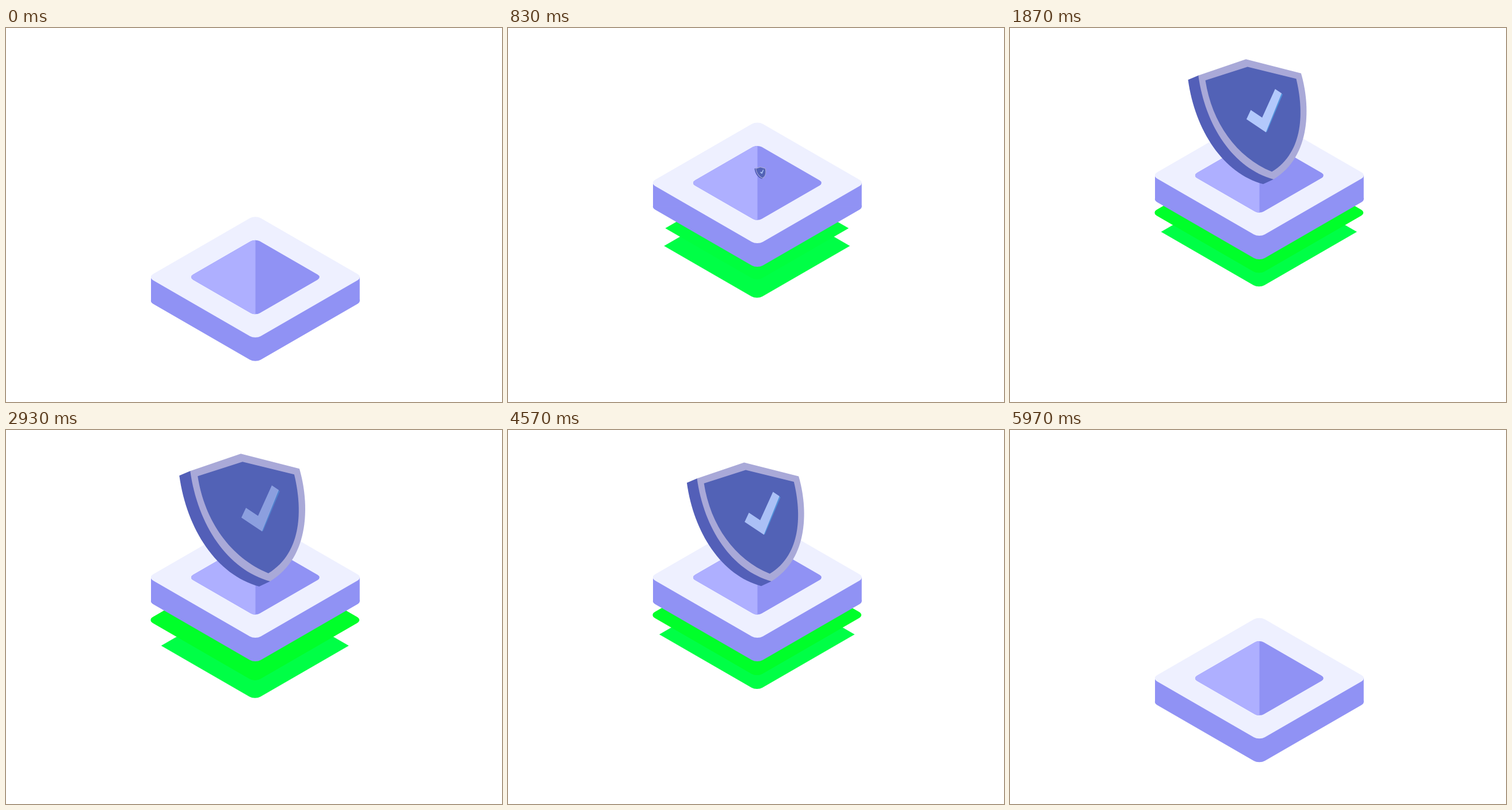
An HTML page with a canvas for the animation above (6010 ms loop, 862 by 650 pixels).

```html
<!DOCTYPE html>
<html lang="en">
<head>
<meta charset="utf-8">
<title>Shield platform</title>
<style>
  html, body { margin: 0; width: 100%; height: 100%; overflow: hidden; background: #fff; }
  canvas { display: block; }
</style>
</head>
<body>
<canvas id="stage" width="862" height="650"></canvas>
<script>
const ctx = document.getElementById('stage').getContext('2d');
const LOOP = 6010, CX = 433.3;

// Sine ease-in-out from 0 to 1 while s runs from a to b
const ease = (s, a, b) => {
  const u = Math.min(1, Math.max(0, (s - a) / (b - a)));
  return (1 - Math.cos(Math.PI * u)) / 2;
};
// Rises from a to peak, falls from peak to b
const bump = (s, a, peak, b) => s < peak ? ease(s, a, peak) : 1 - ease(s, peak, b);

// Isometric rounded square centred on (x, y)
function tile(x, y, side, r) {
  const path = new Path2D(), square = new Path2D();
  square.roundRect(-side / 2, -side / 2, side, side, r);
  path.addPath(square, new DOMMatrix([.866, .5, -.866, .5, x, y]));
  return path;
}

function fill(path, color) {
  ctx.fillStyle = color;
  ctx.fill(path);
}

function platform(y) {
  const top = tile(CX, y, 216, 11), well = tile(CX, y, 134, 9);
  fill(tile(CX, y + 41, 216, 11), '#9092f4');
  ctx.fillRect(252, y, 362.7, 41);
  fill(top, '#eef0ff');
  fill(well, '#9092f4');
  ctx.save();
  ctx.clip(well);
  ctx.fillStyle = '#aeafff';
  ctx.fillRect(300, y - 80, 133.5, 160);
  ctx.restore();
}

// Green sheet whose upper edge is cut away by the given amount
function sheet(y, cut, color) {
  ctx.save();
  ctx.clip(tile(432.7, y + cut, 216, 11));
  fill(tile(432.7, y, 216, 11), color);
  ctx.restore();
}

const SIDE = new Path2D('M301 79L320 71L408 60L459 263L440 272C366 252 314 173 301 79Z');
const RIM = new Path2D('M408 41L510 67C527 125 530 220 459 263C385 243 333 165 320 71Z');
const FACE = new Path2D('M411 55L501 77C515 135 516 212 456 249C390 222 345 158 333 80Z');
const TICK_EDGE = new Path2D('M462 96L476 106L447 176L445 176L409 152Z');
const TICK = new Path2D('M417 135L438 149L462 96L474 104L445 176L409 152Z');
const TICK_SHADE = new Path2D('M473 104L476 106L447 175L444.5 176Z');

function shield(scale, glow) {
  if (scale <= 0) return;
  ctx.save();
  ctx.translate(441.2, 261.3);
  ctx.scale(scale, scale);
  ctx.translate(-441.2, -261.3);
  fill(SIDE, '#535fb8');
  fill(RIM, '#a9a9d8');
  fill(FACE, '#5262b6');
  ctx.globalAlpha = glow;
  fill(TICK_SHADE, '#5294dc');
  fill(TICK, '#b4cafc');
  ctx.restore();
}

function draw(s) {
  ctx.fillStyle = '#fff';
  ctx.fillRect(0, 0, 862, 650);

  const y = 433 - 176.7 * (ease(s, .0085, 1.0085) - ease(s, 5.327, 6.007));
  if (y < 345) {
    const lift = s > 1 && s < 5.4 ? (1 - Math.cos(2 * Math.PI * (s - 1) / 2.2)) / 2 : 0;
    const solid = ease(s, 1, 1.5) - ease(s, 4.9, 5.4);
    sheet(364 - 21.8 * lift, 29.4 - 11 * lift, 'rgb(0,255,70)');
    sheet(332 - 12.3 * lift, 32 * (1 - solid), `rgb(0,255,${Math.round(62 - 20 * solid)})`);
  }
  platform(y);

  const pop = ease(s, .79, 1) - ease(s, 5.3, 5.488);
  const breath = bump(s, 1, 3.1, 5.33);
  shield(pop * (.905 + .095 * breath), 1 - .42 * bump(s, 1.8, 3.1, 5.2));
}

// The picture advances at 30 steps per second on a 10 ms clock
function tick() {
  const t = Math.floor(performance.now() % LOOP / 10) * 10;
  const step = Math.min(179, Math.floor((t + 4) * .03));
  draw(step / 30);
  requestAnimationFrame(tick);
}
tick();
</script>
</body>
</html>
```
